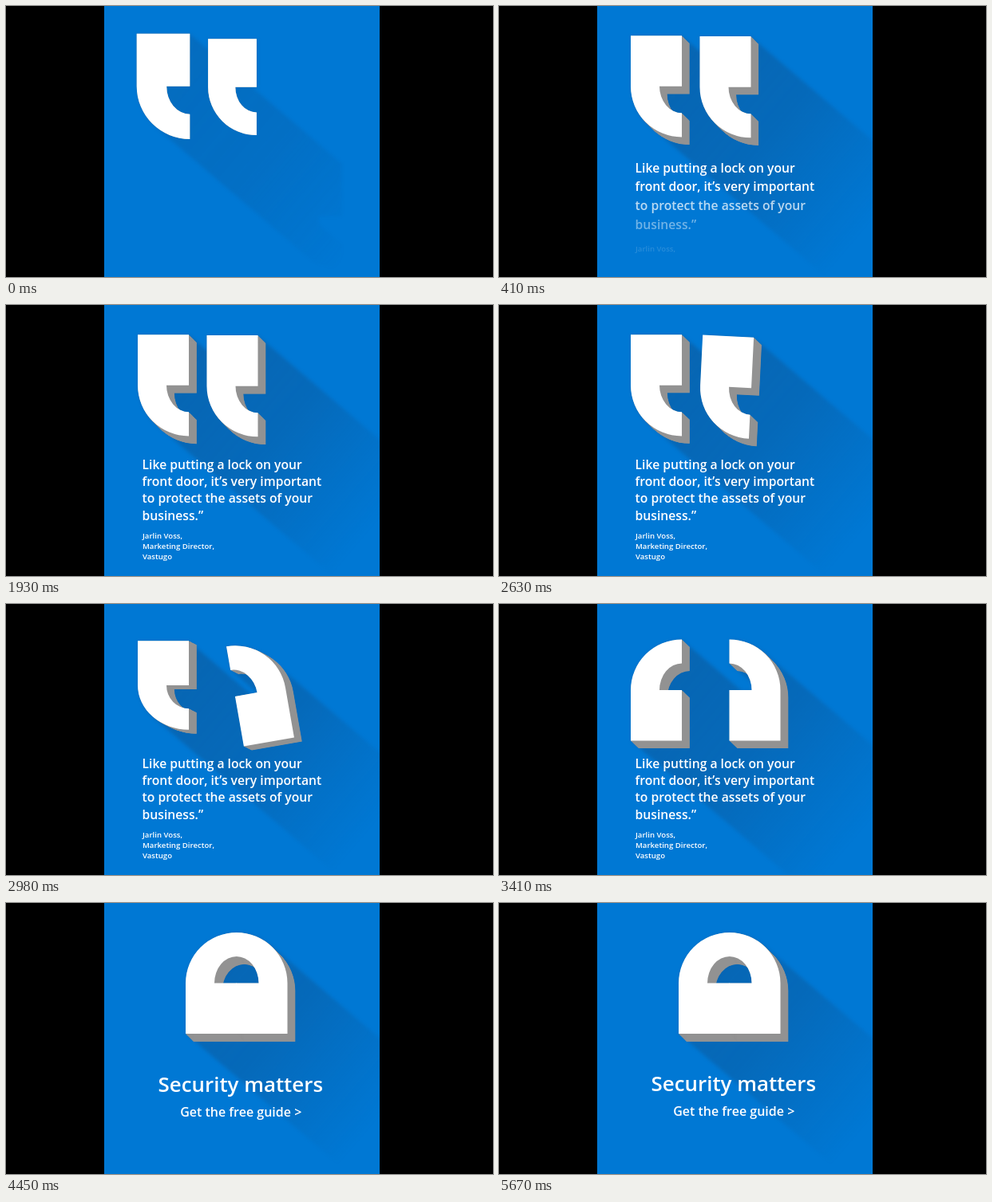
An HTML page with a canvas that plays this animation: 610 by 340 pixels, repeating every 5740 ms.

```html
<!DOCTYPE html>
<html lang="en">
<head>
<meta charset="utf-8">
<style>
  html, body { margin: 0; width: 100%; height: 100%; overflow: hidden; background: #000; }
  canvas { display: block; }
</style>
</head>
<body>
<canvas id="stage" width="610" height="340"></canvas>
<script>
const LOOP = 5740;
const PANEL = { x: 123, y: 0, w: 345, h: 340 };
const SHADOW_DIR = { x: 0.76, y: 0.65 };
const SHADOW_LENGTH = 330;

const canvas = document.getElementById('stage');
const ctx = canvas.getContext('2d');
const shadowLayer = document.createElement('canvas');
shadowLayer.width = canvas.width;
shadowLayer.height = canvas.height;
const shadowCtx = shadowLayer.getContext('2d');

const progress = (t, from, to) => Math.min(1, Math.max(0, (t - from) / (to - from)));
const inOutCubic = u => u < 0.5 ? 4 * u ** 3 : 1 - 4 * (1 - u) ** 3;
const mix = (a, b, u) => a + (b - a) * u;

// Smooth interpolation through [time, value] pairs.
function keyed(t, keys) {
  let i = 0;
  while (i < keys.length - 2 && t > keys[i + 1][0]) i++;
  const [[t0, v0], [t1, v1]] = [keys[i], keys[i + 1]];
  const u = progress(t, t0, t1);
  return mix(v0, v1, u * u * (3 - 2 * u));
}

// One quotation mark, centred on its origin.
const markShape = new Path2D();
markShape.moveTo(-32, -63.6);
markShape.lineTo(32, -63.6);
markShape.lineTo(32, 0);
markShape.lineTo(4, 0);
markShape.ellipse(32, 0, 28, 33.5, 0, Math.PI, Math.PI / 2, true);
markShape.lineTo(32, 63.6);
markShape.ellipse(32, 0, 64, 63.6, 0, Math.PI / 2, Math.PI);
markShape.closePath();

const fadeGradient = shadowCtx.createLinearGradient(170, 110, 420, 324);
fadeGradient.addColorStop(0, 'rgba(13,86,150,.55)');
fadeGradient.addColorStop(0.5, 'rgba(13,86,150,.42)');
fadeGradient.addColorStop(1, 'rgba(13,86,150,0)');

function fillMark(c, mark, dx = 0, dy = 0) {
  c.save();
  c.translate(mark.x + dx, mark.y + dy);
  c.rotate(mark.angle);
  c.scale(mark.scale, mark.scale * mark.flip);
  c.fill(markShape);
  c.restore();
}

function sweepMark(c, mark, dx, dy, step) {
  const count = Math.ceil(Math.hypot(dx, dy) / step);
  for (let i = 1; i <= count; i++) fillMark(c, mark, dx * i / count, dy * i / count);
}

function marksAt(t) {
  const turn = inOutCubic(progress(t, 2540, 3120));
  const flip = inOutCubic(progress(t, 2780, 3367));
  const slide = progress(t, 3770, 3980) ** 2;
  const lift = keyed(t, [[3960, 0], [4130, -15], [4300, -6.5], [4420, -7.5]]);
  return [
    {
      x: 197 + 60 * slide,
      y: mix(100.8, 108, flip) + lift,
      angle: 0,
      flip: Math.cos(Math.PI * flip),
      scale: keyed(t, [[0, 1.04], [220, 1]]),
      shadow: mix(250, SHADOW_LENGTH, progress(t, 0, 300))
    },
    {
      x: mix(283.5, 320.5, turn),
      y: keyed(t, [[2540, 101.7], [2980, 110.4], [3200, 108]]) + lift,
      angle: Math.PI * turn,
      flip: 1,
      scale: keyed(t, [[0, 0.95], [140, 1.03], [320, 1]]),
      shadow: SHADOW_LENGTH * progress(t, 0, 350)
    }
  ];
}

function drawShadow(t, marks) {
  shadowCtx.globalCompositeOperation = 'source-over';
  shadowCtx.clearRect(0, 0, 610, 340);
  shadowCtx.fillStyle = '#000';
  for (const m of marks) {
    sweepMark(shadowCtx, m, SHADOW_DIR.x * m.shadow, SHADOW_DIR.y * m.shadow, 1.5);
  }
  shadowCtx.globalCompositeOperation = 'source-in';
  shadowCtx.fillStyle = fadeGradient;
  shadowCtx.fillRect(0, 0, 610, 340);
  ctx.save();
  ctx.globalAlpha = mix(0.6, 1, progress(t, 0, 350));
  ctx.filter = 'blur(2px)';
  ctx.drawImage(shadowLayer, 0, 0);
  ctx.restore();
}

function drawMarks(t, marks) {
  const grow = keyed(t, [[0, 0], [450, 1]]);
  const depthY = keyed(t, [[2560, 9.8], [2980, 5], [3500, 9.8]]);
  ctx.fillStyle = '#929292';
  for (const m of marks) sweepMark(ctx, m, 9.8 * grow, depthY * grow, 0.5);
  ctx.fillStyle = '#fff';
  for (const m of marks) fillMark(ctx, m);
}

const line = (text, x, y, size, enter, exit) => ({ text, x, y, size, enter, exit });

const quoteLines = [
  'Like putting a lock on your',
  'front door, it’s very important',
  'to protect the assets of your',
  'business.”',
  'Jarlin Voss,',
  'Marketing Director,',
  'Vastugo'
].map((text, i) => {
  const enter = 85 + 72 * i, exit = 3606 - 41 * i;
  return i < 4
    ? line(text, 170.6, 205.9 + 21.2 * i, 15.7, enter, exit)
    : line(text, 171, 293 + 13 * (i - 4), 9.6, enter, exit);
});

const lines = [
  ...quoteLines,
  line('Security matters', 190.6, 236, 25.9, 3930, Infinity),
  line('Get the free guide >', 218.2, 266.5, 16, 3990, Infinity)
];

function drawLine(t, { text, x, y, size, enter, exit }) {
  if (t < enter) return;
  const rise = (enter > 3000 ? 14 : 18) * Math.exp((enter - t) / 200);
  const drop = t > exit ? progress(t, exit, exit + 450) ** 2 : 0;
  ctx.globalAlpha = progress(t, enter, enter + 250) * (1 - drop * drop);
  ctx.font = `600 ${size}px "Open Sans", "Noto Sans", sans-serif`;
  ctx.fillText(text, x, y + rise + 25 * drop);
  ctx.globalAlpha = 1;
}

function render(t) {
  ctx.fillStyle = '#000';
  ctx.fillRect(0, 0, 610, 340);
  ctx.save();
  ctx.beginPath();
  ctx.rect(PANEL.x, PANEL.y, PANEL.w, PANEL.h);
  ctx.clip();
  ctx.fillStyle = '#0078d4';
  ctx.fillRect(PANEL.x, PANEL.y, PANEL.w, PANEL.h);
  const marks = marksAt(t);
  drawShadow(t, marks);
  drawMarks(t, marks);
  ctx.fillStyle = '#fff';
  for (const l of lines) drawLine(t, l);
  ctx.restore();
}

const start = performance.now();
function tick() {
  render((performance.now() - start) % LOOP);
  requestAnimationFrame(tick);
}
tick();
</script>
</body>
</html>
```
